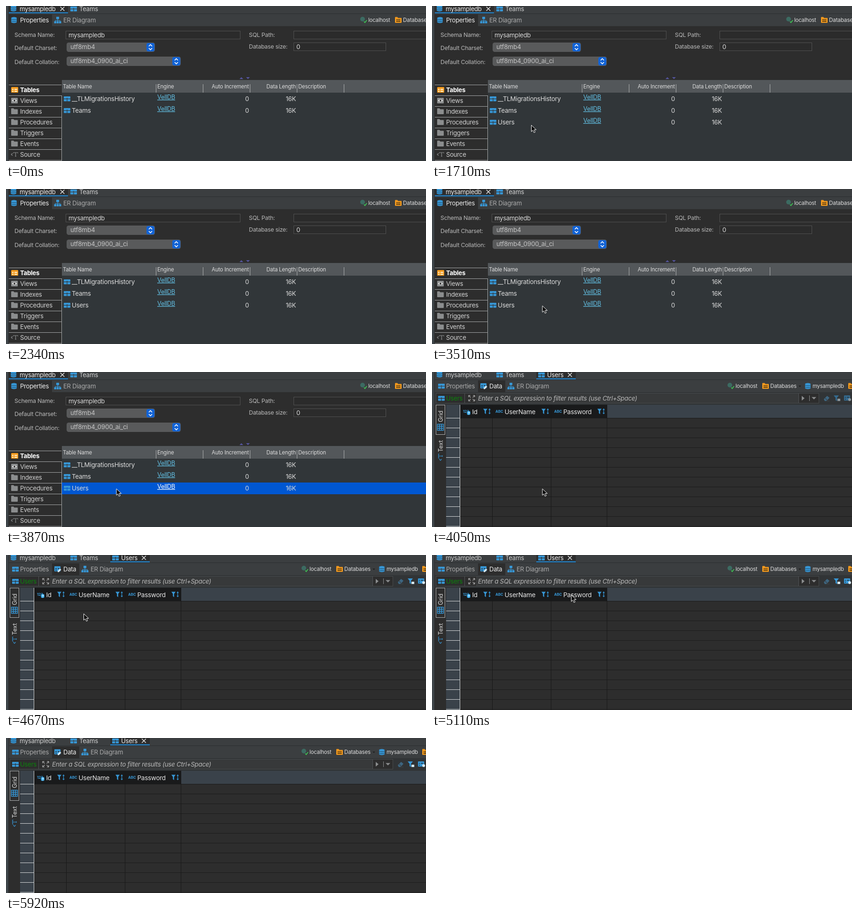
An HTML page that plays this animation: 894x331 px, repeating every 6550 ms.

```html
<!DOCTYPE html>
<html lang="en">
<head>
<meta charset="utf-8">
<title>Database table browser</title>
<style>
  html, body { margin: 0; width: 100%; height: 100%; overflow: hidden; background: #2d2d2d; }
  svg { display: block; width: 100%; height: 100%; }
  text { font-family: Inter, Roboto, sans-serif; letter-spacing: -.02em; white-space: pre; }
  rect { shape-rendering: crispEdges; }
  rect[rx] { shape-rendering: auto; }
</style>
</head>
<body>
<svg id="stage" viewBox="0 0 894 331"></svg>
<script>
const LOOP = 6550;
const BLUE = '#3797d6', ORANGE = '#f39a1e', GREY = '#8b8d8e', PANEL = '#2d2d2d', BAR = '#3b3e40', SLATE = '#3a424a';

// Drawing helpers, all returning SVG markup
const text = (x, y, s, size = 13.2, fill = '#dcdcdc', more = '') =>
  `<text x="${x}" y="${y}" font-size="${size}" fill="${fill}" ${more}>${s}</text>`;
const rect = (x, y, w, h, fill, more = '') =>
  `<rect x="${x}" y="${y}" width="${w}" height="${h}" fill="${fill}" ${more}/>`;
const frame = (x, y, w, h, stroke) => rect(x + .5, y + .5, w - 1, h - 1, 'none', `stroke="${stroke}"`);
const line = (d, stroke, width = 1) => `<path d="${d}" fill="none" stroke="${stroke}" stroke-width="${width}"/>`;
const fill = (d, color) => `<path d="${d}" fill="${color}"/>`;
const at = (x, y, s) => `<g transform="translate(${x} ${y})">${s}</g>`;
const group = (id, s) => `<g id="${id}">${s}</g>`;
const each = (list, fn) => list.map(fn).join('');
const range = (n, fn) => each([...Array(n).keys()], fn);

// Icons, centred on the given point
const icon = {
  database: (x, y) => at(x, y,
    fill('M-6-4a6 2.6 0 0 1 12 0V4a6 2.6 0 0 1-12 0z', BLUE) +
    line('M-6-3a6 2.4 0 0 0 12 0M-6 1a6 2.4 0 0 0 12 0', '#24506d', 1.1)),
  table: (x, y) => at(x, y,
    fill('M-7-4q0-1 1-1H6q1 0 1 1V-.3H.6V-2H-.6V-.3H-7zM-7 1H-.6V5.5H-6q-1 0-1-1zM.6 1H7V4.5q0 1-1 1H.6z', BLUE)),
  diagram: (x, y) => at(x, y,
    line('M0-2V1M-5 3V1H5V3M0 1v2', BLUE, 1.2) +
    fill('M-3-7h6v5h-6zM-7.5 2.5h4.5V7h-4.5zM-2.2 2.5h4.4V7h-4.4zM3 2.5h4.5V7H3z', BLUE)),
  folder: (x, y, color = GREY) => at(x, y, fill('M-7-5.5q0-1 1-1h4l1.6 2H6q1 0 1 1V5q0 1-1 1H-6q-1 0-1-1z', color)),
  orangeFolder: (x, y) => icon.folder(x, y, ORANGE) +
    at(x, y, fill('M-4-2h2.2v2H-4zM-1-2h2.2v2H-1zM2-2h2.2v2H2zM-4 1h2.2v3H-4zM-1 1h2.2v3H-1zM2 1h2.2v3H2z', '#5a3d12')),
  list: (x, y) => at(x, y,
    rect(-7, -6, 15, 12, ORANGE, 'rx="1.5"') +
    fill('M-5-2h3v2h-3zM0-2h6v2H0zM-5 2h3v2h-3zM0 2h6v2H0z', '#fff3dd')),
  eye: (x, y) => at(x, y,
    rect(-7, -6, 14, 12, GREY, 'rx="1"') + fill('M-5 0q5-6 10 0q-5 6-10 0', '#eee') +
    '<circle r="2.2" fill="#444"/>'),
  source: (x, y, color) => at(x, y, line('M-4-2.5l-2.8 2.5 2.8 2.5M-2-2.5v-1.5H7v1.5M2.5-4V4M1 4h3', color, 1.2)),
  link: (x, y) => `<circle cx="${x - 2}" cy="${y - 2}" r="5" fill="#3c6b62"/>` +
    line(`M${x + 1} ${y + 3}l2 2.3 4-5`, '#3ec455', 1.8),
  funnel: (x, y) => at(x, y,
    fill('M0-5.5H9L5.8-1V6L3.2 4V-1z', BLUE) +
    line('M13.5-5v10M11.7-3l1.8-2.3L15.3-3M11.7 3l1.8 2.3L15.3 3', BLUE, 1.2)),
  grid: (x, y) => at(x, y, line('M-6.5-6.5h13v13h-13zM-6.5-2.2h13M-6.5 2.2h13M-2.2-6.5v13M2.2-6.5v13', BLUE, 1.5)),
  sheet: (x, y) => at(x, y,
    rect(-7, -6, 13, 11, BLUE, 'rx="1"') + fill('M-5-2h3v2h-3zM0-2h4v2H0zM-5 1.5h3v2h-3z', '#24465c') +
    fill('M0 4l5-5 2.5 2.5-5 5H0z', '#d9e8f2')),
  close: (x, y) => at(x, y, line('M-4.3-4.3l8.6 8.6M4.3-4.3l-8.6 8.6', '#e8e8e8', 1.4)),
};

const tabBars = (tabX, tabW, subX, subW) =>
  rect(0, 0, 894, 43, BAR) + rect(tabX, 0, tabW, 13, PANEL) +
  rect(5, 16, 889, 1, '#2b2e30') + rect(tabX, 13, tabW, 3, '#2673ab') +
  rect(subX, 18, subW, 25, PANEL) +
  icon.database(16, 5) + icon.table(144, 6) + text(156, 10.5, 'Teams', 13.2, '#cfcfcf');

const edge = rect(0, 0, 5, 331, '#3e4448') + rect(5, 0, 1, 331, '#292b2d');

// Properties page
const input = (x, y, w, value = '') =>
  rect(x, y, w, 18, '#2b2b2b') + frame(x, y, w, 18, '#515151') + text(x + 6, y + 14, value);
const combo = (x, y, w, value) =>
  rect(x, y, w, 20, '#595a5b', 'rx="4.5"') + text(x + 8, y + 14, value, 13.5, '#c4c4c4') +
  rect(x + w - 18, y + 1, 17, 18, '#1263d5', 'rx="4"') +
  line(`M${x + w - 13} ${y + 8}l3.5-3.5 3.5 3.5m-7 4l3.5 3.5 3.5-3.5`, '#fff', 1.6);
const tableRow = (y, name, linkColor = '#62bfe3') =>
  icon.table(130, y) + text(140, y + 5, name, 13.4) +
  text(322, y + 1, 'VellDB', 12.8, linkColor, 'text-decoration="underline"') +
  text(517, y + 5, '0', 13.2, '#dcdcdc', 'text-anchor="end"') +
  text(617, y + 5, '16K', 13.2, '#dcdcdc', 'text-anchor="end"');

const sections = ['Tables', 'Views', 'Indexes', 'Procedures', 'Triggers', 'Events', 'Source'];
const sectionIcons = [icon.list, icon.eye, icon.folder, icon.folder, icon.folder, icon.folder, icon.source];
const sidebar =
  rect(6, 168, 113, 163, PANEL) +
  each(sections, (name, i) => {
    const y = 179 + 23 * i;
    return sectionIcons[i](18, y, i ? GREY : ORANGE) +
      text(30, y + 5, name, 13.2, i ? '#d2d2d2' : '#fff', i ? '' : 'font-weight="700"');
  }) +
  range(8, i => rect(6, 168 + 23 * i, 112, 1, '#a5a7a8')) + rect(118, 191, 1, 140, '#a5a7a8');

const header =
  rect(119, 158, 775, 27, '#53575a') +
  each([319, 419, 519, 619, 719], x => rect(x, 167, 1, 18, '#aeb0b1')) +
  each([[121, 'Table Name'], [322, 'Engine'], [622, 'Description']], ([x, s]) => text(x, 176, s, 11.4)) +
  each([[517, 'Auto Increment'], [617, 'Data Length']], ([x, s]) => text(x, 176, s, 11.4, '#dcdcdc', 'text-anchor="end"'));

const propertiesPage =
  rect(0, 0, 894, 331, PANEL) + tabBars(6, 126, 6, 92) +
  text(29, 10.5, 'mysampledb', 13.1, '#f0f0f0') + icon.close(120, 6) +
  icon.database(17, 30) + text(30, 35, 'Properties', 13.1, '#f0f0f0') +
  icon.diagram(110, 30) + text(122, 35, 'ER Diagram', 13.1, '#aaa') +
  icon.link(761, 30) + text(771, 34, 'localhost', 11.4) + icon.orangeFolder(835, 30) + text(845, 34, 'Databases', 11.8) +
  each([[18, 66, 'Schema Name:'], [18, 94, 'Default Charset:'], [18, 124, 'Default Collation:'],
    [517, 66, 'SQL Path:'], [517, 91, 'Database size:']], ([x, y, s]) => text(x, y, s, 12.35, '#b9b9b9')) +
  input(127, 53, 372, 'mysampledb') + input(612, 53, 290) + input(612, 78, 197, '0') +
  combo(129, 78, 188, 'utf8mb4') + combo(129, 108, 243, 'utf8mb4_0900_ai_ci') +
  fill('M497 156l4-4 4 4zM511 152h8l-4 4z', '#55559f') +
  rect(119, 185, 775, 146, '#313639') + header + sidebar +
  tableRow(198, '__TLMigrationsHistory') + tableRow(223, 'Teams') +
  group('newRow', tableRow(248, 'Users')) +
  group('selectedRow', rect(119, 236, 775, 25, '#0057d2') + tableRow(248, 'Users', '#fff')) + edge;

// Data page
const column = (x, right, type, name) =>
  text(x, 87, type, 7.8, BLUE, 'font-weight="700"') +
  text(x + 19.5, 90, name, 13.5, '#e8e8e8') + icon.funnel(right - 20, 84);
const sideLabel = (y, s) => text(0, 0, s, 12.8, '#d8d8d8', `transform="translate(22.5 ${y}) rotate(-90)"`);

const gridArea =
  rect(30, 70, 864, 28, SLATE) + rect(30, 98, 30, 233, SLATE) + rect(60, 70, 312, 28, '#191a1b') +
  rect(60, 98, 834, 233, PANEL) +
  range(12, i => rect(60, 98 + 21 * i, 834, 1, '#1b1b1b') + rect(30, 98 + 21 * i, 30, 1, '#d5d7d8')) +
  each([128, 253, 372], x => rect(x, 70, 1, 261, '#181818')) + rect(59, 70, 1, 261, '#d5d7d8') +
  column(66, 129, '123', 'Id') + rect(74.5, 83.5, 7, 8, '#39aef0', 'rx="2"') +
  text(76.2, 90.5, '?', 7.5, '#fff', 'font-weight="700"') +
  column(135, 253, 'ABC', 'UserName') + column(260, 372, 'ABC', 'Password');

const filterBar =
  rect(8, 45, 816, 22, PANEL) + rect(97, 46, 683, 20, '#37393a') + frame(8, 45, 816, 22, '#484b4d') +
  icon.table(20, 56) + text(30, 61, 'Users', 13.2, '#0b830b') + rect(69, 46, 1, 20, '#505355') +
  line('M78 54v-4h4M87 50h4v4M91 58v4h-4M82 62h-4v-4M78 50l4.5 4.5M91 50l-4.5 4.5M78 62l4.5-4.5M91 62l-4.5-4.5', '#a8a8a8', 1.2) +
  rect(95, 46, 1, 20, '#505355') +
  text(98, 60.5, 'Enter a SQL expression to filter results (use Ctrl+Space)', 13.4, '#b9b9b9', 'font-style="italic"') +
  rect(780, 46, 1, 20, '#505355') + fill('M787 51l6 5-6 5z', GREY) + rect(803, 50, 1, 12, GREY) +
  fill('M808 53.5h10l-5 5z', GREY) +
  at(840, 56, fill('M-6 2l7-7 5 4-6 7h-4z', '#3d6580') + line('M-3 0l4 4M-1 6h7', BAR, 1.3)) +
  group('filterTools', at(855, 56,
    fill('M0-6H11L7-1V6L4 4V-1z', BLUE) + rect(8, 1, 6, 5, '#d4e4ed') +
    rect(22, -6, 13, 11, BLUE, 'rx="1"') + fill('M24-3h2v2h-2zM28-3h5v2h-5zM24 1h2v2h-2z', '#24465c') +
    '<circle cx="34" cy="3" r="3" fill="#d4e4ed"/>'));

const dataPage =
  rect(0, 0, 894, 331, PANEL) + tabBars(222, 84, 98, 58) + rect(6, 43, 888, 27, '#313436') +
  text(29, 10.5, 'mysampledb', 13.1, '#cfcfcf') +
  icon.table(233, 6) + text(245, 10.5, 'Users', 13.2, '#f0f0f0') + icon.close(293.5, 6) +
  icon.table(20, 30) + text(30, 35, 'Properties', 13.1, '#aaa') +
  icon.sheet(110, 30) + text(122, 35, 'Data', 13.1, '#f0f0f0') +
  icon.diagram(168, 30) + text(180, 35, 'ER Diagram', 13.1, '#aaa') +
  icon.link(636, 30) + text(646, 34, 'localhost', 11.4) +
  icon.orangeFolder(710, 30) + text(720, 34, 'Databases', 11.6) + fill('M780.5 29h5l-2.5 3z', '#1d1d1d') +
  icon.database(800, 30) + text(810, 34, 'mysampledb', 11.4) + icon.orangeFolder(893, 30) +
  filterBar + gridArea +
  frame(8, 70, 20, 64, '#b0b2b3') +
  sideLabel(107, 'Grid') + icon.grid(18, 118) +
  sideLabel(171, 'Text') + at(18, 182, `<g transform="rotate(-90)">${icon.source(0, 0, BLUE)}</g>`) + edge;

const pointer = '<path d="M.5.5V14.2l3.2-3 2.3 5.2 2.6-1.1-2.3-5h4.6z" fill="#090909" stroke="#fff" stroke-width="1"/>';

const stage = document.getElementById('stage');
stage.innerHTML = group('properties', propertiesPage) + group('data', dataPage) + group('cursor', pointer);
const part = id => document.getElementById(id);
const show = (id, on) => part(id).setAttribute('visibility', on ? 'inherit' : 'hidden');

// Each move steps evenly through its points between two times, then rests on the last
const moves = [
  { from: 1710, to: 2340, points: [[211, 254], [157, 215], [182, 158], [255, 134], [345, 153], [392, 212], [365, 290], [340, 340]] },
  { from: 2880, to: 3060, points: [[326, 315], [298, 288], [280, 273]] },
  { from: 3240, to: 3330, points: [[250, 258], [234.5, 249]] },
  { from: 4220, to: 4490, points: [[228, 228], [210, 186], [193, 153], [185, 141]] },
  { from: 4670, to: 5285, points: [[165, 125], [115, 97], [76, 76], [112, 55], [215, 48], [296, 85], [308, 93], [313, 98]] },
  { from: 5470, to: 5650, points: [[420, 139], [650, 226], [759, 268]] },
];

function cursorAt(time) {
  const move = moves.findLast(m => time >= m.from);
  if (!move) return [-50, -50];
  const last = move.points.length - 1;
  const step = Math.floor((time - move.from) / (move.to - move.from) * last + 1e-6);
  return move.points[Math.min(step, last)];
}

function draw() {
  const time = performance.now() % LOOP;
  const dataOpen = time >= 3960;
  show('properties', !dataOpen);
  show('data', dataOpen);
  show('newRow', time >= 810);
  show('selectedRow', time >= 3600);
  part('filterTools').setAttribute('opacity', time < 4140 ? .55 : 1);
  part('cursor').setAttribute('transform', `translate(${cursorAt(time)})`);
  part('cursor').setAttribute('opacity', time < 5830 ? 1 : time < 5920 ? .5 : 0);
  requestAnimationFrame(draw);
}
draw();
</script>
</body>
</html>
```
